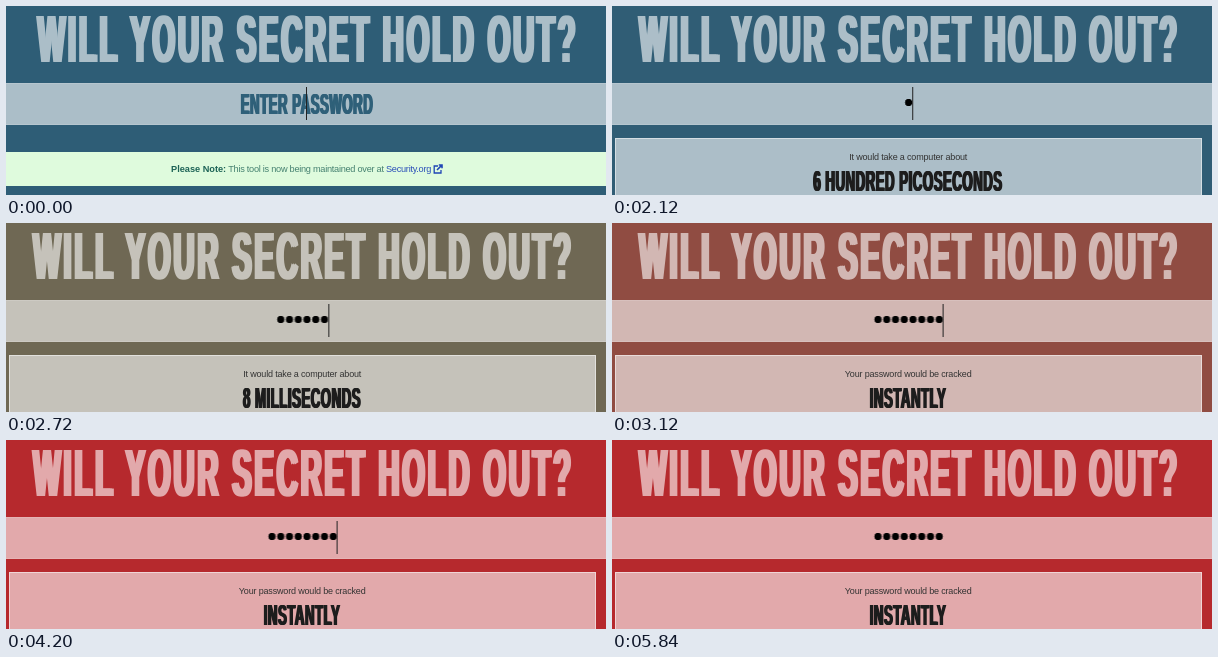
Recreate the animation shown at these times as an HTML page. Size 600 by 189 pixels, loop 5.88 s.

```html
<!DOCTYPE html>
<html lang="en">
<head>
<meta charset="utf-8">
<title>Password check</title>
<style>
  :root { --loop: 5880ms; --blue: #2e5d76; --red: #b6292d; --pale: rgba(255, 255, 255, .6); }

  html, body { margin: 0; width: 100%; height: 100%; overflow: hidden; }
  body {
    position: relative;
    font-family: "Liberation Sans", Arial, sans-serif;
    animation: mood var(--loop) infinite;
  }
  body * { position: absolute; box-sizing: border-box; }

  /* --x is the centre of a line, --y its baseline */
  .line {
    left: var(--x);
    top: calc(var(--y) - .3465em);
    width: max-content;
    line-height: 0;
    white-space: nowrap;
    transform: translateX(-50%);
  }
  .gothic {
    font-size: 30px;
    font-weight: 700;
    letter-spacing: .04em;
    text-shadow: -.06em 0, .06em 0;
    transform: translateX(-50%) scaleX(.44);
  }
  .small { font-size: 9px; letter-spacing: -.17px; color: #333; }

  h1.gothic {
    --x: 302px; --y: 56px;
    margin: 0;
    font-size: 66px;
    letter-spacing: .1em;
    color: #fff;
    opacity: .6;
    animation: nudge var(--loop) step-end infinite;
  }

  .field {
    left: 0; top: 77px; width: 100%; height: 42px;
    background: var(--pale);
    border: solid rgba(255, 255, 255, .65);
    border-width: 1px 0;
    background-clip: padding-box;
  }
  .hint { --x: 300.7px; --y: 108px; color: #2f6079; }
  .dots {
    left: 300.8px; top: 81px; height: 33px;
    transform: translateX(-50%);
    background: radial-gradient(circle at 50% 47%, #000 3.4px, transparent 4px) 0 0 / 8.75px 100%;
    animation: type var(--loop) infinite, nudge var(--loop) step-end infinite;
  }
  .caret {
    left: 100%; top: 0; width: 1px; height: 33px;
    margin-left: -.5px;
    background: #222;
    animation: blink var(--loop) step-end infinite;
  }

  .before { animation: before var(--loop) step-end infinite; }
  .after { visibility: hidden; animation: after var(--loop) step-end infinite; }

  .note { left: 0; top: 146px; width: 100%; height: 34px; background: #dffbdd; }
  .note p {
    left: 165px; top: 16.8px;
    margin: 0;
    font-size: 9.2px;
    line-height: 0;
    letter-spacing: -.27px;
    white-space: nowrap;
    color: #44806f;
  }
  .note b, .note a { position: static; }
  .note b { color: #1d6356; letter-spacing: 0; }
  .note a { color: #2a4fb8; }
  .note svg { left: 427px; top: 12px; width: 10px; height: 10px; fill: none; stroke: #1f45b5; }

  .panel {
    left: 3px; top: 132px; width: 587px; height: 80px;
    background: var(--pale);
    background-clip: padding-box;
    border: 1px solid rgba(255, 255, 255, .8);
  }
  .result { --x: 296.4px; --y: 185.5px; color: #1d1d1d; }
  .result, .wait, .done { visibility: hidden; }
  .result {
    animation: slot var(--loop) step-end infinite;
    animation-delay: calc(2080ms + var(--i) * 111ms - var(--loop));
  }
  .small { --x: 296.2px; --y: 154.5px; }
  .wait { animation: wait var(--loop) step-end infinite; }
  .done { animation: done var(--loop) step-end infinite; }

  @keyframes mood {
    0% { background-color: var(--blue); }
    35.374% { background-color: var(--blue); animation-timing-function: ease-in; }
    40.136% { background-color: #596462; animation-timing-function: ease-out; }
    48.588% { background-color: #726852; animation-timing-function: ease; }
    65.595%, 100% { background-color: var(--red); }
  }
  @keyframes nudge {
    0% { translate: 0 0; }
    35.374%, 100% { translate: -4.4px 0; }
  }
  @keyframes type {
    0% { width: 0; }
    35.374% { width: 0; animation-timing-function: steps(8, start); }
    50.476%, 100% { width: 70px; }
  }
  @keyframes blink {
    0%, 12.585%, 29.592%, 65.595%, 82.602% { opacity: 1; }
    4.082%, 21.088%, 57.092%, 74.099%, 91.105%, 100% { opacity: 0; }
  }
  @keyframes before {
    0% { visibility: visible; }
    35.374%, 100% { visibility: hidden; }
  }
  @keyframes after {
    0% { visibility: hidden; }
    35.374%, 100% { visibility: visible; }
  }
  @keyframes slot {
    0% { visibility: visible; }
    1.888%, 100% { visibility: hidden; }
  }
  @keyframes wait {
    0%, 48.588%, 100% { visibility: hidden; }
    35.374% { visibility: visible; }
  }
  @keyframes done {
    0% { visibility: hidden; }
    48.588%, 100% { visibility: visible; }
  }
</style>
</head>
<body>
  <h1 class="line gothic">WILL YOUR SECRET HOLD OUT?</h1>

  <div class="field"></div>
  <div class="line gothic hint before">ENTER PASSWORD</div>
  <div class="dots"><div class="caret"></div></div>

  <div class="note before">
    <p><b>Please Note:</b> This tool is now being maintained over at <a>Security.org</a></p>
    <svg viewBox="0 0 10 10">
      <path d="M5 2H1.2V9H8V6" stroke-width="1.3"/>
      <path d="M4 6L8.6 1.4M5.8 1H9V4.2" stroke-width="1.6"/>
    </svg>
  </div>

  <div class="panel after"></div>
  <div class="line small wait">It would take a computer about</div>
  <div class="line gothic result" style="--i:0">6 HUNDRED PICOSECONDS</div>
  <div class="line gothic result" style="--i:1">17 NANOSECONDS</div>
  <div class="line gothic result" style="--i:2">4 HUNDRED NANOSECONDS</div>
  <div class="line gothic result" style="--i:3">11 MICROSECONDS</div>
  <div class="line gothic result" style="--i:4">3 HUNDRED MICROSECONDS</div>
  <div class="line gothic result" style="--i:5">8 MILLISECONDS</div>
  <div class="line gothic result" style="--i:6">2 HUNDRED MILLISECONDS</div>
  <div class="line small done">Your password would be cracked</div>
  <div class="line gothic result done" style="--i:7; animation: done var(--loop) step-end infinite">INSTANTLY</div>
</body>
</html>
```
